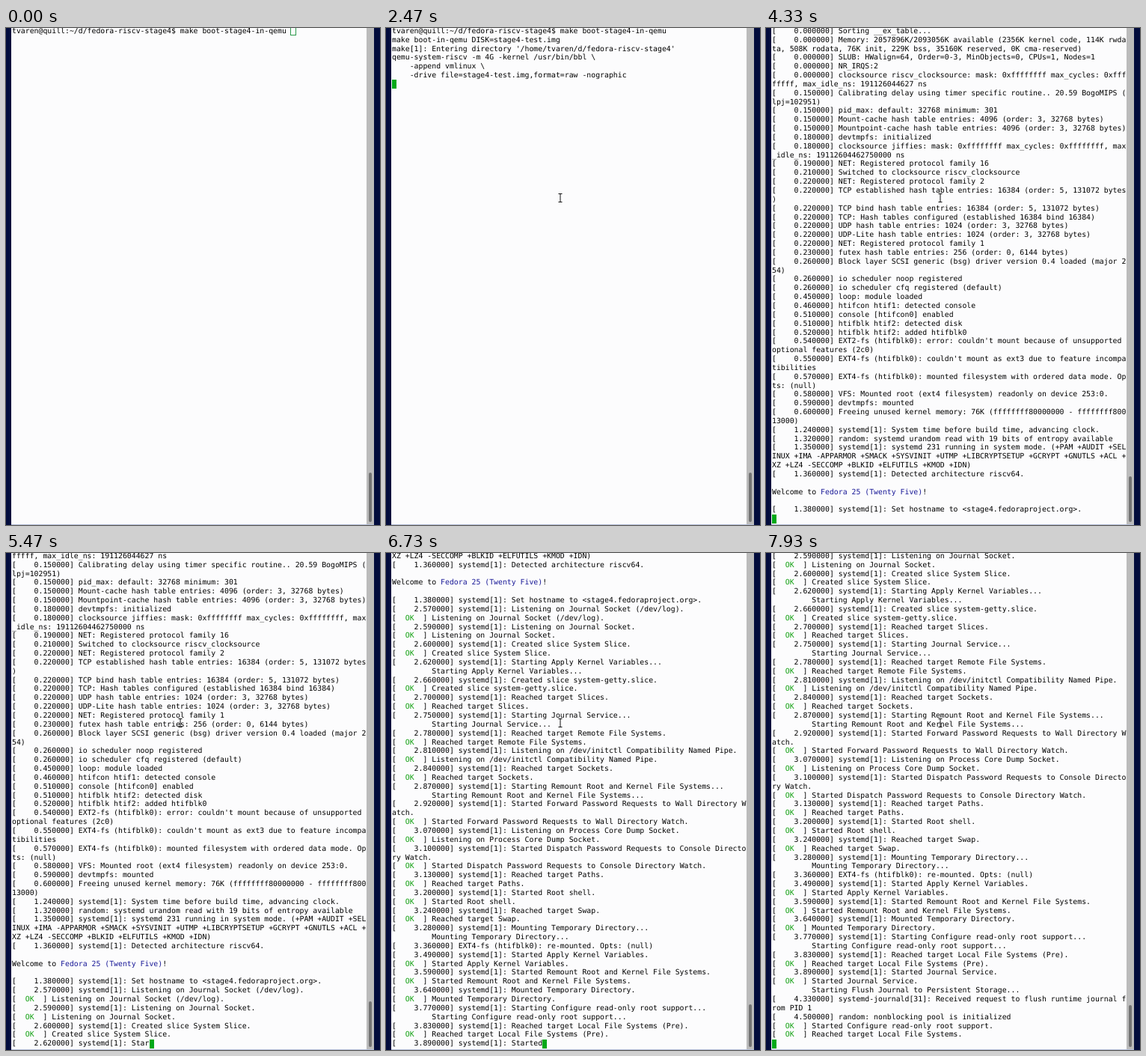
These frames come from a looping animation (500 px wide and 664 px high, 8000 ms). An HTML page:

```html
<!DOCTYPE html>
<html lang="en">
<head>
<meta charset="utf-8">
<title>Booting in an emulator</title>
<style>
  html, body { margin: 0; width: 100%; height: 100%; overflow: hidden; background: #020c3c; }
  #stage { position: absolute; left: 0; top: 0; width: 500px; height: 664px; overflow: hidden; }
  #stage > * { position: absolute; }
  #paper { left: 7px; top: 0; width: 475px; height: 664px; background: #fcfcfd; }
  #trough { left: 482px; top: 0; width: 10px; height: 664px; background: #bbb; }
  #thumb { left: 485px; bottom: 4px; width: 4px; border-radius: 2px; background: #747474; }
  #edge { left: 7px; top: 663px; width: 485px; height: 1px; background: #b4bed8; }
  #screen {
    left: 8px; top: -1.2px; margin: 0; color: #000;
    font: 9.842px/11.85px "DejaVu Sans Mono", monospace;
    text-rendering: geometricPrecision; font-variant-ligatures: none;
  }
  #screen .ok { color: #12a012; }
  #screen .os { color: #1a1a98; }
  #cursor { box-sizing: border-box; width: 6px; height: 12px; background: #00a818; }
  #cursor.idle { width: 8px; background: none; border: 1px solid #2c9a4c; }
  #pointer { left: -4px; top: -7px; width: 8px; height: 14px; }
</style>
</head>
<body>
<div id="stage">
  <div id="paper"></div>
  <div id="trough"></div>
  <div id="thumb"></div>
  <div id="edge"></div>
  <div id="cursor"></div>
  <pre id="screen"></pre>
  <svg id="pointer" viewBox="-4 -7 8 14">
    <path d="M-2.5-5.5H2.5M0-5.5V5.5M-2.5 5.5H2.5" fill="none" stroke="#111"/>
  </svg>
</div>
<script>
const LOOP = 8000, TICK = 200 / 3;
const COLS = 80, ROWS = 56, CELL_W = 5.925, CELL_H = 11.85, LEFT = 8, TOP = -2.2;
const $ = id => document.getElementById(id);

const stamp = (sec, msg) => `[${sec.toFixed(6).padStart(12)}] ${msg}\n`;

// "0.15 message" per line becomes a kernel log line.
const kernel = text => text.trim().split("\n").map(line => {
  const [, sec, msg] = line.match(/^(\S+) (.*)$/);
  return stamp(+sec, msg);
}).join("");

// Each unit event is logged, then repeated as a status line.
const units = text => text.trim().split("\n").map(line => {
  const [, sec, msg] = line.match(/^(\S+) (.*)$/);
  const status = /^(Starting|Mounting)/.test(msg) ? " ".repeat(9) : "[  OK  ] ";
  return stamp(+sec, "systemd[1]: " + msg) + status + msg + "\n";
}).join("");

const command = "tvaren@quill:~/d/fedora-riscv-stage4$ make boot-stage4-in-qemu ";

const makeOutput = `
make boot-in-qemu DISK=stage4-test.img
make[1]: Entering directory '/home/tvaren/d/fedora-riscv-stage4'
qemu-system-riscv -m 4G -kernel /usr/bin/bbl \\
    -append vmlinux \\
    -drive file=stage4-test.img,format=raw -nographic
`;

const banner = ("  " + "v".repeat(42) + "\n").repeat(21) +
  "\n       INSTRUCTION SET WANT TO BE FREE\n";

const bootLog = kernel(`
0 Linux version 4.6.0 (gcc version 6.1.0 (GCC))
0 Available physical memory: 2044MB
0 Zone ranges:
0   Normal   [mem 0x0000000000200000-0x000000007fdfffff]
0 Movable zone start for each node
0 Early memory node ranges
0   node   0: [mem 0x0000000000200000-0x000000007fdfffff]
0 Initmem setup node 0 [mem 0x0000000000200000-0x000000007fdfffff]
0 Built 1 zonelists in Zone order, mobility grouping on.  Total pages: 516110
0 Kernel command line: root=/dev/htifblk0 init=/init
0 PID hash table entries: 4096 (order: 3, 32768 bytes)
0 Dentry cache hash table entries: 262144 (order: 9, 2097152 bytes)
0 Inode-cache hash table entries: 131072 (order: 8, 1048576 bytes)
0 Sorting __ex_table...
0 Memory: 2057896K/2093056K available (2356K kernel code, 114K rwdata, 508K rodata, 76K init, 229K bss, 35160K reserved, 0K cma-reserved)
0 SLUB: HWalign=64, Order=0-3, MinObjects=0, CPUs=1, Nodes=1
0 NR_IRQS:2
0 clocksource riscv_clocksource: mask: 0xffffffff max_cycles: 0xffffffff, max_idle_ns: 191126044627 ns
0.15 Calibrating delay using timer specific routine.. 20.59 BogoMIPS (lpj=102951)
0.15 pid_max: default: 32768 minimum: 301
0.15 Mount-cache hash table entries: 4096 (order: 3, 32768 bytes)
0.15 Mountpoint-cache hash table entries: 4096 (order: 3, 32768 bytes)
0.18 devtmpfs: initialized
0.18 clocksource jiffies: mask: 0xffffffff max_cycles: 0xffffffff, max_idle_ns: 19112604462750000 ns
0.19 NET: Registered protocol family 16
0.21 Switched to clocksource riscv_clocksource
0.22 NET: Registered protocol family 2
0.22 TCP established hash table entries: 16384 (order: 5, 131072 bytes)
0.22 TCP bind hash table entries: 16384 (order: 5, 131072 bytes)
0.22 TCP: Hash tables configured (established 16384 bind 16384)
0.22 UDP hash table entries: 1024 (order: 3, 32768 bytes)
0.22 UDP-Lite hash table entries: 1024 (order: 3, 32768 bytes)
0.22 NET: Registered protocol family 1
0.23 futex hash table entries: 256 (order: 0, 6144 bytes)
0.26 Block layer SCSI generic (bsg) driver version 0.4 loaded (major 254)
0.26 io scheduler noop registered
0.26 io scheduler cfq registered (default)
0.45 loop: module loaded
0.46 htifcon htif1: detected console
0.51 console [htifcon0] enabled
0.51 htifblk htif2: detected disk
0.52 htifblk htif2: added htifblk0
0.54 EXT2-fs (htifblk0): error: couldn't mount because of unsupported optional features (2c0)
0.55 EXT4-fs (htifblk0): couldn't mount as ext3 due to feature incompatibilities
0.57 EXT4-fs (htifblk0): mounted filesystem with ordered data mode. Opts: (null)
0.58 VFS: Mounted root (ext4 filesystem) readonly on device 253:0.
0.59 devtmpfs: mounted
0.6 Freeing unused kernel memory: 76K (ffffffff80000000 - ffffffff80013000)`);

const initLog = kernel(`
1.24 systemd[1]: System time before build time, advancing clock.
1.32 random: systemd urandom read with 19 bits of entropy available
1.35 systemd[1]: systemd 231 running in system mode. (+PAM +AUDIT +SELINUX +IMA -APPARMOR +SMACK +SYSVINIT +UTMP +LIBCRYPTSETUP +GCRYPT +GNUTLS +ACL +XZ +LZ4 -SECCOMP +BLKID +ELFUTILS +KMOD +IDN)
1.36 systemd[1]: Detected architecture riscv64.`) +
  "\nWelcome to Fedora 25 (Twenty Five)!\n\n" +
  stamp(1.38, "systemd[1]: Set hostname to <stage4.fedoraproject.org>.");

const unitLog = units(`
2.57 Listening on Journal Socket (/dev/log).
2.59 Listening on Journal Socket.
2.60 Created slice System Slice.
2.62 Starting Apply Kernel Variables...
2.66 Created slice system-getty.slice.
2.70 Reached target Slices.
2.75 Starting Journal Service...
2.78 Reached target Remote File Systems.
2.81 Listening on /dev/initctl Compatibility Named Pipe.
2.84 Reached target Sockets.
2.87 Starting Remount Root and Kernel File Systems...
2.92 Started Forward Password Requests to Wall Directory Watch.
3.07 Listening on Process Core Dump Socket.
3.10 Started Dispatch Password Requests to Console Directory Watch.
3.13 Reached target Paths.
3.20 Started Root shell.
3.24 Reached target Swap.
3.28 Mounting Temporary Directory...`) +
  stamp(3.36, "EXT4-fs (htifblk0): re-mounted. Opts: (null)") +
  units(`
3.49 Started Apply Kernel Variables.
3.59 Started Remount Root and Kernel File Systems.
3.64 Mounted Temporary Directory.
3.77 Starting Configure read-only root support...
3.83 Reached target Local File Systems (Pre).
3.89 Started Journal Service.`) +
  " ".repeat(9) + "Starting Flush Journal to Persistent Storage...\n";

// Splits the text right after each of the given phrases.
function splitAfter(text, ...phrases) {
  let from = 0;
  const parts = phrases.map(phrase => {
    const to = text.indexOf(phrase, from) + phrase.length;
    const part = text.slice(from, to);
    from = to;
    return part;
  });
  return [...parts, text.slice(from)];
}
const [sockets, services, mounts, journal] = splitAfter(unitLog,
  "2.620000] systemd[1]: Star", "3.280000] systemd[1]: Mounting Temporary Directory...\n",
  "3.890000] systemd[1]: Started");

// [start ms, end ms, text printed evenly in between]
const script = [
  [0, 0, command],
  [870, 1000, makeOutput],
  [2470, 2800, banner],
  [3280, 3660, bootLog],
  [4080, 4330, initLog],
  [5405, 5470, sockets],
  [5470, 6130, services],
  [6130, 6730, mounts],
  [6730, 6790, journal],
  [7180, 7200, stamp(4.33, "systemd-journald[31]: Received request to flush runtime journal from PID 1")],
  [7340, 7390, stamp(4.5, "random: nonblocking pool is initialized")],
  [7600, 7660, "[  OK  ] Started Configure read-only root support.\n"],
  [7800, 7860, "[  OK  ] Reached target Local File Systems.\n"]
];

function printed(now) {
  let out = "";
  for (const [start, end, text] of script) {
    if (now < start) break;
    const part = end > start ? Math.min(1, (now - start) / (end - start)) : 1;
    out += text.slice(0, Math.ceil(part * text.length));
  }
  return out;
}

const wrap = line => line.match(new RegExp(`.{1,${COLS}}`, "g")) || [""];

const paint = row => row.replace(/&/g, "&amp;").replace(/</g, "&lt;")
  .replace(/^\[  OK/, '[  <span class="ok">OK</span>')
  .replace(/Fedora 25 \(.*\)/, '<span class="os">$&</span>');

function drawPointer(now) {
  const p = Math.min(1, Math.max(0, (now - 400) / 470));
  const rest = (1 - p) ** 2;
  $("pointer").style.transform = `translate(${233 + 275 * rest}px, ${227 + 100 * rest}px)`;
}

function draw(now) {
  const rows = printed(now).split("\n").flatMap(wrap);
  const view = rows.slice(-ROWS);
  const last = view.length - 1;
  const idle = now < 470;
  $("screen").innerHTML = view.map(paint).join("\n");
  const cursor = $("cursor");
  cursor.className = idle ? "idle" : "";
  cursor.style.left = LEFT + view[last].length * CELL_W - (idle ? 1 : 0) + "px";
  cursor.style.top = TOP + last * CELL_H + "px";
  $("thumb").style.height = 660 * ROWS / (504 + Math.max(ROWS, rows.length)) + "px";
  drawPointer(now);
}

const begin = performance.now();
let shown = -1;
function frame() {
  const time = (performance.now() - begin) % LOOP;
  const now = Math.round(Math.floor((time + 4) / TICK) * TICK / 10) * 10 % LOOP;
  if (now !== shown) draw(shown = now);
  requestAnimationFrame(frame);
}
frame();
</script>
</body>
</html>
```
